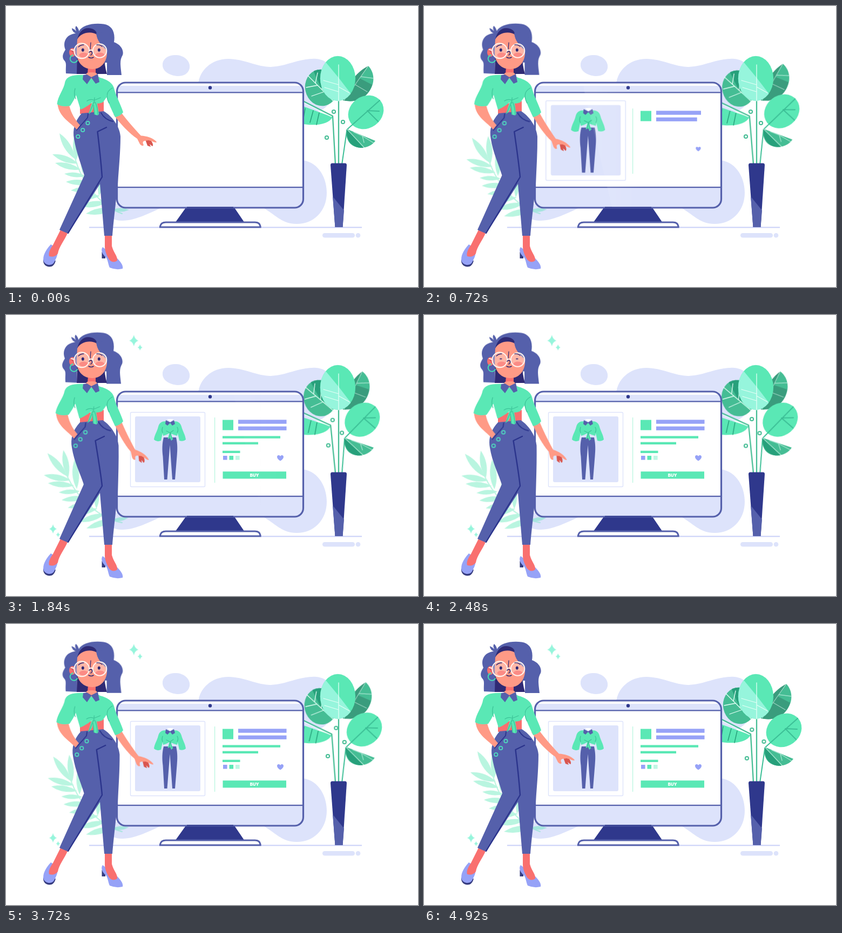
These frames come from a looping animation (763x521 px, 4960 ms). An HTML page:

```html
<!DOCTYPE html>
<html lang="en">
<head>
<meta charset="utf-8">
<title>Online shop</title>
<style>
  html, body { margin: 0; width: 100%; height: 100%; overflow: hidden; background: #fff; }
  svg { display: block; width: 100vw; height: 100vh; }
  .blob { fill: #dde3fb; }
  .mint { fill: #5ae8b5; }
  .pale { fill: #96f5dc; }
  .navy { fill: #2f388c; }
  .blue { fill: #5560ab; }
  .lilac { fill: #96a2f7; }
  .skin { fill: #ff9a86; }
  .coral { fill: #f9706f; }
  .hair { fill: #5560ab; }
  .shade { fill: #2f2a74; }
  .leaf { fill: #45bd94; }
  .deep { fill: #27a07b; }
  .ln { fill: none; stroke-linecap: round; stroke-linejoin: round; }
  .frame { stroke: #5560ab; stroke-width: 3.2; }
  .seam { stroke: #2b348c; stroke-width: 2.4; }
  .fold { stroke: #3cc398; stroke-width: 1.3; }
  .vein { stroke: #e4fff6; stroke-width: 1.3; }
  .stem { stroke: #45bd94; stroke-width: 2.3; }
  .ring { fill: #fff; stroke: #45bd94; stroke-width: 2; }
  .pop { transform-box: fill-box; transform-origin: center; }
  .left { transform-origin: left center; }

  .sway { animation: sway 4960ms infinite; }
  .bush { animation: bush 4960ms infinite; transform-origin: 215px 385px; }
  .morph { animation: morph 4960ms infinite; }
  .eyes { animation: blink 4960ms infinite; transform-origin: 157px 81.5px; }

  @keyframes sway {
    0% { transform: none; animation-timing-function: cubic-bezier(.28,.1,.3,1); }
    40% { transform: var(--to); animation-timing-function: linear; }
    50% { transform: var(--to); animation-timing-function: cubic-bezier(.4,.2,.6,.95); }
    100% { transform: none; }
  }
  @keyframes morph {
    0% { animation-timing-function: cubic-bezier(.28,.1,.3,1); }
    40% { d: var(--to); animation-timing-function: linear; }
    50% { d: var(--to); animation-timing-function: cubic-bezier(.4,.2,.6,.95); }
  }
  @keyframes bush {
    0% { transform: none; animation-timing-function: cubic-bezier(.3,.1,.3,1); }
    50% { transform: rotate(-9.6deg); animation-timing-function: cubic-bezier(.4,.15,.6,.9); }
    100% { transform: none; }
  }
  @keyframes blink {
    0%, 48.4% { transform: none; }
    49.6%, 50.6% { transform: scaleY(.3); }
    51.8%, 100% { transform: none; }
  }
</style>
</head>
<body>
<svg viewBox="0 0 763 521">
  <defs>
    <clipPath id="oval"><ellipse cx="614.5" cy="134.3" rx="32.6" ry="41.5"/></clipPath>
    <clipPath id="backOval"><ellipse cx="584" cy="151.500" rx="30" ry="34" transform="rotate(-12 584 151.500)"/></clipPath>
    <clipPath id="screen"><rect x="207" y="144" width="342" height="229" rx="14"/></clipPath>
    <linearGradient id="glow" gradientUnits="userSpaceOnUse" x1="385" y1="0" x2="478" y2="0">
      <stop stop-color="#fff"/><stop offset="1" stop-color="#fff" stop-opacity="0"/>
    </linearGradient>
    <path id="star" class="pale" d="M0 -10.500 Q2 -2 8.500 0 Q2 2 0 10.500 Q-2 2 -8.500 0 Q-2 -2 0 -10.500Z"/>
  </defs>

  <!-- backdrop -->
  <g class="blob">
    <path d="M290 108 C291 95 305 90 316 91 C332 92 342 104 340 115 C338 126 328 130 318 130 C303 129 289 121 290 108Z"/>
    <path d="M356 145 C358 120 380 98 412 98 C440 98 465 113 490 113 C520 112 545 96 575 98 C598 100 607 118 606 150 C605 180 595 198 545 203 V160Z"/>
    <path d="M545 286 C575 286 594 315 594 346 C594 382 568 405 537 404 C508 403 498 385 472 372 L545 360Z"/>
    <path d="M292 372 C270 382 240 398 215 398 C200 398 192 393 185 380 L205 366Z"/>
    <rect x="586" y="421" width="60" height="8.600" rx="4.300"/>
    <circle cx="652" cy="425.300" r="4.300"/>
  </g>
  <path d="M154 410.500H659" stroke="#c9d0f8" stroke-width="2"/>

  <!-- potted plant -->
  <g class="sway" style="--to:rotate(-5deg);transform-origin:613px 183px">
    <g clip-path="url(#backOval)">
      <path class="leaf" d="M550 110H620V190H550Z"/>
      <path class="deep" d="M565 110 L583 151 L616 182 V110Z"/>
    </g>
    <path class="ln vein" d="M559 129 L608 178 M573 143 L577 124 M585 155 L588 133 M577 147 L556 151 M589 159 L566 167"/>
  </g>
  <g class="sway" style="--to:rotate(-9.4deg);transform-origin:626px 176px">
    <path class="leaf" d="M671 111 C684 125 684 147 668 164 C655 177 640 178 624 175Z"/>
    <path fill="#3a9c7d" d="M671 111 C650 122 635 140 624 175 C640 178 655 177 668 164 Q675 156 678 146 L655 134Z"/>
    <path class="ln vein" opacity=".55" d="M671 111 L626 175 M657 131 L680 134 M647 146 L669 159"/>
  </g>
  <path class="ln stem" d="M616 172V294"/>
  <g class="sway" style="--to:rotate(-2.5deg);transform-origin:610px 292px">
    <path class="mint" d="M540 182 L605 206 C597 220 572 224 540 217Z"/>
    <path class="ln" stroke="#27a07b" stroke-width="1.500" d="M569 194 L563 216 M580 198 L575 220 M554 190 L551 208"/>
    <path class="ln stem" d="M540 171 L605 204 L610 294"/>
    <path class="ln vein" d="M543 175 L602 205"/>
  </g>
  <g class="sway" style="--to:rotate(-4deg);transform-origin:622px 292px">
    <ellipse class="mint" cx="666.500" cy="197" rx="34.500" ry="29.500" transform="rotate(-36 666.500 197)"/>
    <path class="ln" stroke="#3cbf96" stroke-width="2" d="M622 294 L631.500 229 L692 175 M669 194 L691 195 M669 194 L689 214"/>
    <path class="leaf" d="M631 228 L684 250 C675 264 652 266 641 258 C631 251 629 239 631 228Z"/>
    <path class="deep" d="M631 228 L662 263 C644 264 629 253 631 228Z"/>
    <path class="ln vein" opacity=".6" d="M631 228 L663 262 M644 234 L660 241 L681 254 M660 241 L663 253"/>
  </g>
  <g clip-path="url(#oval)">
    <path class="mint" d="M580 90H650V180H580Z"/>
    <path class="pale" d="M580 90 L592 104 L616 133 L639 163 L630 180 H580Z"/>
  </g>
  <path class="ln vein" d="M616 109V176 M616 146 L588 138 M616 159 L590 151 M616 150 L636 161"/>
  <g id="rings">
    <circle class="ring" r="3.100"/><circle class="ring" r="3.100"/><circle class="ring" r="3.100"/>
  </g>
  <path class="navy" d="M601 295 Q601 291.500 604 291.500 H628 Q631 291.500 631 295 L623.500 410 H609.500Z"/>
  <path class="blue" d="M605 353 L626 379 L623.500 410 H609.500Z"/>

  <!-- fern -->
  <g id="fern" class="bush" opacity=".42">
    <path class="ln" stroke="#5ae8b5" stroke-width="2" d="M215 385 C178 372 140 330 127 279"/>
  </g>

  <!-- monitor -->
  <path class="navy" d="M333 374 H423 L442 402 H313Z"/>
  <path class="frame" fill="#fff" d="M285.500 410 V408.500 Q287 401 296 401 H461 Q470 401 471 408.500 V410Z"/>
  <rect x="205.500" y="142" width="345" height="232" rx="16" fill="#fff"/>
  <path class="blob" d="M207 148H549V160H207Z M207 336H549V362Q547 373 536 373H220Q209 373 207 362Z"/>
  <path class="ln frame" style="stroke-width:2.200" d="M206 160.300H550M206 336.200H550"/>
  <rect class="ln frame" x="205.500" y="142" width="345" height="232" rx="16"/>
  <path stroke="#2f388c" stroke-width="2" d="M335 373.500H421"/>
  <circle class="navy" cx="378" cy="151.500" r="3.200"/>

  <!-- product page -->
  <g id="card" class="pop">
    <rect x="230.500" y="180.500" width="138" height="138" rx="2" fill="#fff" stroke="#dde3fb" stroke-width="1.400"/>
    <rect class="blob" x="239" y="188" width="121" height="122" rx="3"/>
    <path class="blue" d="M292 227 H315 C318 240 317.500 250 316.500 262 L313 305 H308 L303.500 241 L298.500 305 H293 L290.500 262 C289 250 289 238 292 227Z"/>
    <path class="mint" d="M296 197 C288 197 284 200 282 207 C280 216 275 222 274 231 Q279 236 287 233 L290 219 L291 224 Q298 222 303 219 Q310 222 317 224 L318 219 L321 233 Q329 235 333 231 C332 222 327 215 325 207 C323 200 319 197 311 197 L304 200Z"/>
    <path class="mint" d="M303 217 L299.500 230 L304 228 L306 233 L309.500 230Z"/>
    <path class="ln fold" d="M290 208 Q288 214 290 218 M317 208 Q320 213 317 218 M303 218 L297 215 M304 218 L310 214 M304 219 L302 229 M305 219 L307 230"/>
    <path class="blue" d="M296 195 L304 199 L311 195 L313 202 L308 205 L304 200 L299 205 L295 202Z"/>
    <path fill="#fff" d="M298 193 H310 L304 198Z"/>
  </g>
  <path id="rule" class="pop" d="M386 190H387.200V311H386Z" fill="#b5f5de"/>
  <rect id="badge" class="pop mint" x="401" y="194.500" width="20" height="19"/>
  <rect id="bar1" class="pop left lilac" x="430" y="194.300" width="89.500" height="7.400"/>
  <rect id="bar2" class="pop left lilac" x="430" y="206.600" width="89.500" height="7.200"/>
  <rect id="line1" class="pop left mint" x="401" y="224.400" width="107" height="4.400"/>
  <rect id="line2" class="pop left mint" x="401" y="235.600" width="66" height="4.400"/>
  <rect id="line3" class="pop left mint" x="401" y="251.700" width="32.500" height="4.300"/>
  <g id="tints" class="pop left">
    <rect class="lilac" x="402" y="261" width="7.600" height="7.600"/>
    <rect class="mint" x="413.500" y="261" width="7.600" height="7.600"/>
    <rect x="425" y="261" width="7.600" height="7.600" fill="#c0f6e4"/>
  </g>
  <path id="heart" class="pop" fill="#96a2f7" d="M508 270.500 C504 268 502 265.500 502 263 C502 259.500 506.500 259 508 262 C509.500 259 514 259.500 514 263 C514 265.500 512 268 508 270.500Z"/>
  <g id="buy" class="pop">
    <rect class="mint" x="401.500" y="290.200" width="117.500" height="13.300"/>
    <text x="460.200" y="299.700" text-anchor="middle" font-family="Inter, sans-serif" font-weight="900" font-size="7.800" fill="#fff">BUY</text>
  </g>
  <g clip-path="url(#screen)">
    <path id="sheen" class="ln" stroke="url(#glow)" stroke-width="82" opacity="0" d="M405 150L455 360"/>
  </g>

  <!-- sparkles -->
  <g transform="translate(236.700 47.500)"><use id="s1" href="#star"/></g>
  <g transform="translate(248.200 60.200) scale(.55)"><use id="s2" href="#star"/></g>
  <g transform="translate(87 396.500) scale(.84)"><use id="s3" href="#star"/></g>
  <g transform="translate(96.400 407.200) scale(.46)"><use id="s4" href="#star"/></g>

  <!-- legs and shoes -->
  <path fill="#363c80" d="M69 470 C68 480 76 485 84 483 Q90 481 92 472 L80 474Z M177.500 456 L184 460 V468 H177.500Z"/>
  <path class="lilac" d="M83 442 C71 455 68 465 69.500 473 C73 481 83 482 88 477 C92 470 97 462 95.500 450Z"/>
  <path class="lilac" d="M179 447 C175 452 178 460 184 465 C189 469 189 480 192 485 Q204 490 216 487 Q218 480 206 468Z"/>
  <path class="coral" d="M101 415 L114 421 C109 434 98 446 96 459 Q90 467 80 464 C78 458 82 450 87 443Z"/>
  <path class="coral" d="M183 424 H196 V445 C199 457 207 464 206 472 Q198 478 191 470 C187 463 183 455 183 446Z"/>

  <!-- arms -->
  <g class="sway" style="--to:rotate(14.5deg);transform-origin:208px 203px">
    <path fill="#d9564f" d="M257 245 L269 250 Q274 258 271 260 L266 256 L268 261 L262 259Z"/>
    <path class="skin" d="M199 201 L212 196 C225 213 239 229 250 240.500 C260 241 272 244 279 252 C278 255 270 250 264 249 L258 250 C254 250 252 252 255 258 Q252 261 248 256 L243 246 C228 236 212 219 199 201Z"/>
  </g>

  <!-- trousers -->
  <path class="coral" d="M137 184 L181 176 L181 200 H137Z"/>
  <path class="blue morph" d="M140 199 C127 214 123 230 126 246 C130 272 140 295 145 314 L99 415 L115 422 L174 330 L182 426 L197 426 C199 400 204 360 207 330 C209 300 212 270 212 242 C211 225 198 205 181 195Z"
    style='--to:path("M137 199 C123 214 119 230 122 246 C126 272 138 295 144 314 L99 415 L115 422 L174 330 L182 426 L197 426 C199 400 204 360 207 330 C208 300 209 270 208.500 242 C207 225 195 205 179 195Z")'/>
  <path class="ln seam morph" d="M186 225 L169.500 233 C173 262 176 290 178 317 L115 421"
    style='--to:path("M182 225 L165.500 233 C170 262 175 290 178 317 L115 421")'/>
  <g class="sway" style="--to:translate(-4.500px,.5px)">
    <path class="ln seam" style="stroke-width:1.800" d="M152 200 L151 207 L131 230 M176 198 Q183 211 198 214"/>
    <g fill="none" stroke="#4fe0c0" stroke-width="1.700">
      <circle cx="151.500" cy="217" r="3.200"/><circle cx="142.200" cy="230" r="3.200"/><circle cx="133.300" cy="242" r="3.200"/>
    </g>
  </g>

  <!-- torso -->
  <path class="mint" d="M160 131 C182 132 197 141 200 152 C203 166 212 181 217 197 Q212 204 202 206 C196 193 190 181 186 168Z"/>
  <path class="ln fold" d="M197 152 Q187 157 187 167 Q188 176 191 180"/>
  <g class="sway" style="--to:skewX(-2.800deg);transform-origin:158px 125px">
    <path class="skin" d="M95.500 182 L117 184 C121 200 128 211 137 221 L131 229 C120 216 98 206 95.500 182Z"/>
    <path class="mint" d="M145 128 C125 127 113 130 109.500 140 C107 156 96 166 94.500 182 Q104 188 119 185 C123 179 127 172 130 165 L146 160Z"/>
  </g>
  <g class="sway" style="--to:skewX(-1.700deg);transform-origin:158px 125px">
    <path class="mint" d="M143 128 L126 140 L130 166 L138 192 C148 188 156 182 160 178 C166 181 173 182 180 178 L187 168 L186 140 L171 131Z"/>
    <path class="mint" d="M161 173 L153 200 Q160 197 162 186 L164 201 Q172 205 172 199 L168 176Z"/>
    <path class="ln fold" d="M128 153 Q125 164 129 172 M162 174 Q155 172 150 176 M163 175 L175 170 M164 170 L163 180 M163 178 Q158 190 154 199 M165 178 Q170 188 170 201 M162 184 L164 201"/>
  </g>

  <!-- head -->
  <g class="sway" style="--to:translate(-1px,-.5px)">
    <path class="hair" d="M111 125 C110 112 113 106 108 101 C102 94 107 86 110 81 C105 70 109 54 127 51 Q132 50 135 47 C141 35 162 31 181 33.500 C196 36 203 48 200 67 C212 71 219 82 216 91 C210 101 212 109 214 128 H187 V105 L132 105 V126Z"/>
    <path class="hair" d="M134 53 Q121 48 122 41 Q127 43 130 47 Q127 39 130 37 Q135 42 136 50Z"/>
  </g>
  <path class="shade" d="M132 90 H182 Q182 110 187 126 H131Z M132 62 C135 48 143 41 152 41 C162 41 168 46 169 54Z"/>
  <path class="coral" d="M152 113 H166 V126 L158 133 L151 126Z"/>
  <path class="skin" d="M150 124 Q159 122 167 124 L171 130 L158 135 L146 130Z"/>
  <path class="blue" d="M143 128 L150 127 L158 132 L170 126 L173 141 L166 144 L158 133 L150 145 L142 136Z"/>
  <ellipse class="coral" cx="123" cy="86" rx="6" ry="8"/>
  <path class="ln" stroke="#c94f55" stroke-width="1.200" d="M120 83 Q124 82 125 88"/>
  <path class="ln" stroke="#45dcb4" stroke-width="2" d="M124 91 A7 7 0 1 0 132 101"/>
  <path class="skin" d="M132 62 C138 49 158 46 168 53 C169 64 177 73 187 80 C189 101 178 117 160 117 C140 117 129 101 131 80Z"/>
  <path class="hair" d="M167 50 C168 64 177 74 187 82 L188 95 L198 70 L190 48Z"/>
  <g fill="#fff" fill-opacity=".28">
    <circle cx="140.300" cy="83.300" r="14"/><circle cx="173.500" cy="83" r="12.800"/>
  </g>
  <g class="coral" opacity=".6"><ellipse cx="144" cy="91" rx="8.500" ry="4.600"/><ellipse cx="174" cy="91" rx="8.500" ry="4.600"/></g>
  <g class="ln" stroke="#fff4f0" stroke-width="2">
    <circle cx="140.300" cy="83.300" r="14"/><circle cx="173.500" cy="83" r="12.800"/>
    <path d="M154 83 Q158 80 161 83 M126 82 L121 81"/>
  </g>
  <g class="eyes shade"><ellipse cx="142.300" cy="81.500" rx="2.500" ry="3.100"/><ellipse cx="172.300" cy="81.500" rx="2.500" ry="3.100"/></g>
  <g class="ln" stroke="#2f2a74" stroke-width="1.600">
    <path d="M157 68 L156 80 M134 76 Q138 72 144 72 M168 72 Q174 71 178 75" stroke-width="1.300"/>
    <path d="M154 86 Q156 83 159 85 Q161 88 157 91 M153 95 Q158 98 162 95"/>
  </g>
</svg>
<script>
  const T = 4960;
  const $ = id => document.getElementById(id);
  const run = (el, frames) => el.animate(frames, { duration: T, iterations: Infinity });

  // steps: [time, scale] pairs; the scale holds before the first and after the last
  const scale = (id, steps, fn = 'scale') => {
    const all = [[0, steps[0][1]], ...steps, [T, steps[steps.length - 1][1]]];
    run($(id), all.map(([t, s]) => ({ offset: t / T, transform: `${fn}(${s})`, easing: 'ease-out' })));
  };
  const grow = (id, from, to, fn) => scale(id, [[from, 0], [to, 1]], fn);

  scale('card', [[200, 0], [700, 1.078], [1000, 1]]);
  grow('rule', 250, 680, 'scaleY');
  grow('badge', 300, 680);
  grow('bar1', 330, 830, 'scaleX');
  grow('bar2', 420, 870, 'scaleX');
  grow('line1', 730, 1180, 'scaleX');
  grow('line2', 780, 1200, 'scaleX');
  grow('line3', 830, 1220, 'scaleX');
  grow('tints', 880, 1260);
  grow('heart', 560, 830);
  grow('buy', 1160, 1440);
  grow('s1', 1380, 1800);
  grow('s2', 1300, 1700);
  grow('s3', 1500, 1900);
  grow('s4', 1440, 1820);

  const shine = (t, x, opacity) => ({ offset: t / T, transform: `translateX(${x}px)`, opacity });
  run($('sheen'), [shine(0, -104, 0), shine(400, -104, 0), shine(720, -68, .12),
    shine(1320, 0, .38), shine(1900, 66, 0), shine(T, 66, 0)]);

  const times = [0, 720, 1320, 2480, 3160, 4280, T];
  const drift = [
    [[607, 196], [605, 196], [603, 196], [607, 193], [610.5, 191.5], [612, 194], [607, 196]],
    [[624, 215], [624, 217], [622.5, 218], [621.5, 219], [624.5, 220], [629, 218], [629.5, 218]],
    [[594, 244], [596, 242], [597.5, 241], [596, 242.5], [595.5, 243], [596.5, 247], [598, 249]]
  ];
  [...$('rings').children].forEach((ring, i) => run(ring, drift[i].map(([x, y], k) =>
    ({ offset: times[k] / T, transform: `translate(${x}px,${y}px)` }))));

  // fern leaflets: base x, y, tip x, y
  [[128, 284, 99, 236], [133, 292, 86, 275], [138, 303, 91, 291], [147, 315, 108, 311],
   [155, 328, 111, 326], [163, 339, 120, 342], [174, 352, 128, 356], [186, 364, 137, 371],
   [200, 376, 148, 385], [130, 286, 129, 235], [142, 310, 147, 255], [156, 332, 165, 282],
   [172, 352, 180, 310], [186, 366, 199, 332], [196, 378, 228, 378]
  ].forEach(([x, y, u, v]) => {
    const nx = (y - v) * .22, ny = (u - x) * .22, mx = (x + u) / 2, my = (y + v) / 2;
    const p = document.createElementNS('http://www.w3.org/2000/svg', 'path');
    p.setAttribute('class', 'mint');
    p.setAttribute('d', `M${x} ${y}Q${mx + nx} ${my + ny} ${u} ${v}Q${mx - nx} ${my - ny} ${x} ${y}Z`);
    $('fern').append(p);
  });
</script>
</body>
</html>
```
